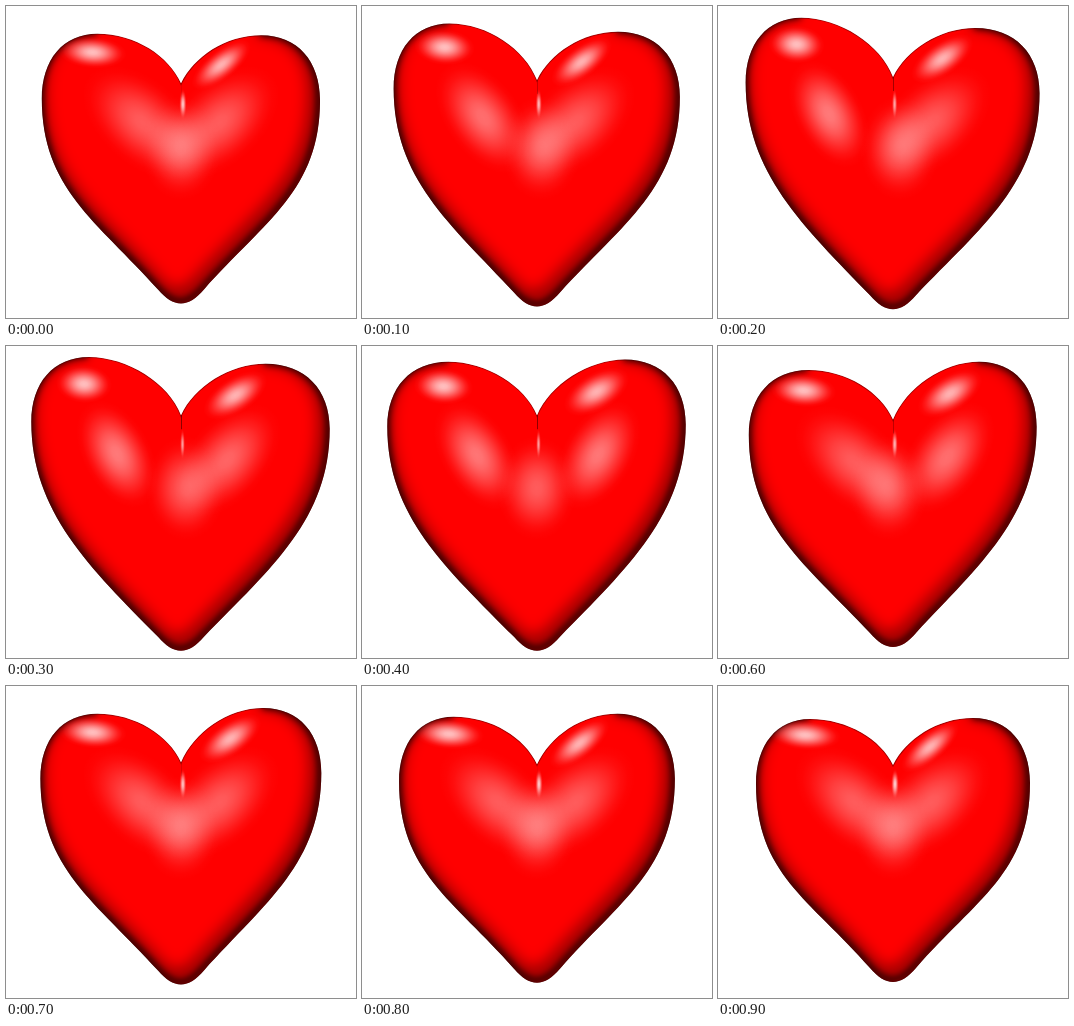
Animation of 350x312 px, one loop 1000 ms. Source, as an HTML page with a canvas:

```html
<!DOCTYPE html>
<html>
<head>
<meta charset="utf-8">
<title>Beating heart</title>
<style>
html, body { margin: 0; width: 100%; height: 100%; overflow: hidden; background: #fff; }
canvas { display: block; }
</style>
</head>
<body>
<canvas id="stage" width="350" height="312"></canvas>
<script>
const ctx = document.getElementById('stage').getContext('2d');
const MID = 175;

const mix = (a, b, k) => a + (b - a) * k;
const smooth = u => {
  u = Math.min(1, Math.max(0, u));
  return u * u * (3 - 2 * u);
};

// p runs from 0 (at rest) through one beat; the left lobe peaks first, then the right
function poseAt(p) {
  const size = Math.sin(Math.PI * p ** .87) ** 2;
  const left = p < .4 ? Math.sin(Math.PI / 2 * smooth(p / .4)) : ((1 - p) / .6) ** 1.3;
  const right = (p < .6 ? p / .6 : (1 - p) / .4) ** 1.2;
  return {
    left, right, size,
    lx: 92 - 9 * left ** 2, ly: mix(33, 11, left), lo: mix(38, 25, size),
    rx: 255 + 12 * right ** 2, ry: mix(32, 9, right), ro: mix(312, 324, size),
    tip: mix(296, 305, size), cleft: mix(79, 69, size)
  };
}

// Outer contour from the left crown, round the tip, to the right crown
function sides(path, { lx, ly, lo, rx, ry, ro, tip }) {
  path.moveTo(lx, ly);
  path.bezierCurveTo(mix(lx, lo, .62), ly, lo, ly + 26, lo, ly + 65);
  path.bezierCurveTo(lo, ly + 155, mix(MID, lo, .607), tip - 83, MID - 23, tip - 14);
  path.bezierCurveTo(MID - 15, tip - 5, MID - 8, tip, MID, tip);
  path.bezierCurveTo(MID + 8, tip, MID + 15, tip - 5, MID + 23, tip - 14);
  path.bezierCurveTo(mix(MID, ro, .607), tip - 83, ro, ry + 155, ro, ry + 65);
  path.bezierCurveTo(ro, ry + 26, mix(rx, ro, .62), ry, rx, ry);
}

function heart(pose) {
  const { lx, ly, rx, ry, cleft } = pose;
  const path = new Path2D();
  sides(path, pose);
  path.bezierCurveTo(rx - 36, ry, MID + 13, mix(ry, cleft, .45), MID, cleft);
  path.bezierCurveTo(MID - 12, mix(ly, cleft, .45), lx + 38, ly, lx, ly);
  path.closePath();
  return path;
}

// Soft elliptical light
function glow(x, y, w, h, deg, alpha) {
  const g = ctx.createRadialGradient(0, 0, 0, 0, 0, 1);
  for (let r = 0; r <= 1; r += .125) {
    g.addColorStop(r, `rgba(255,255,255,${alpha * (1 - smooth(r))})`);
  }
  ctx.save();
  ctx.translate(x, y);
  ctx.rotate(deg * Math.PI / 180);
  ctx.scale(w, h);
  ctx.fillStyle = g;
  ctx.fillRect(-1, -1, 2, 2);
  ctx.restore();
}

// Broad sheen of one lobe: joined to the middle at rest, a separate oval when swollen
function sheen(side, k) {
  glow(MID + side * mix(38, 64, k), mix(117, 108, k),
    mix(72, 58, k), mix(42, 34, k), -side * mix(42, 62, k), mix(.36, .48, k));
}

function shade(edge, blur, width, dx, dy, alpha) {
  ctx.save();
  ctx.filter = `blur(${blur}px)`;
  ctx.translate(dx, dy);
  ctx.strokeStyle = `rgba(0,0,0,${alpha})`;
  ctx.lineWidth = width;
  ctx.stroke(edge);
  ctx.restore();
}

function draw(pose) {
  const { left, right, size, lx, ly, cleft } = pose;
  const shape = heart(pose);
  const edge = new Path2D();
  sides(edge, pose);

  ctx.fillStyle = '#fff';
  ctx.fillRect(0, 0, 350, 312);
  ctx.save();
  ctx.clip(shape);
  ctx.fillStyle = '#f00';
  ctx.fill(shape);
  shade(edge, 8, 13, -4, -7, .5);
  shade(edge, 3, 6, -1, -2, .8);

  const apartL = smooth((left - .45) / .45);
  const apartR = smooth((right - .45) / .45);
  sheen(-1, apartL);
  sheen(1, apartR);
  glow(MID + (apartL - apartR) * 7, 142, 40, 52, 0, .36);

  // Crown highlights
  glow(lx - 5, ly + mix(16, 27, left), mix(36, 28, left), mix(15, 19, left), 4, .75);
  glow(mix(212, 240, right), mix(61, 42, right),
    36, mix(14, 20, right), mix(-40, -28, right), .7);

  // Seam under the cleft
  ctx.fillStyle = `rgba(90,0,0,${.7 * size})`;
  ctx.fillRect(MID, cleft, 1, 14);
  glow(177 - size * .5, 98, mix(4, 2.5, size), 15, 0, mix(.8, .6, size));

  ctx.strokeStyle = 'rgba(70,0,0,.45)';
  ctx.lineWidth = 2;
  ctx.stroke(shape);
  ctx.restore();
}

// Ten held poses a second, starting one step after rest
function tick() {
  const step = Math.floor(performance.now() / 100) % 10;
  draw(poseAt((step + 1) % 10 / 10));
  requestAnimationFrame(tick);
}
tick();
</script>
</body>
</html>
```
